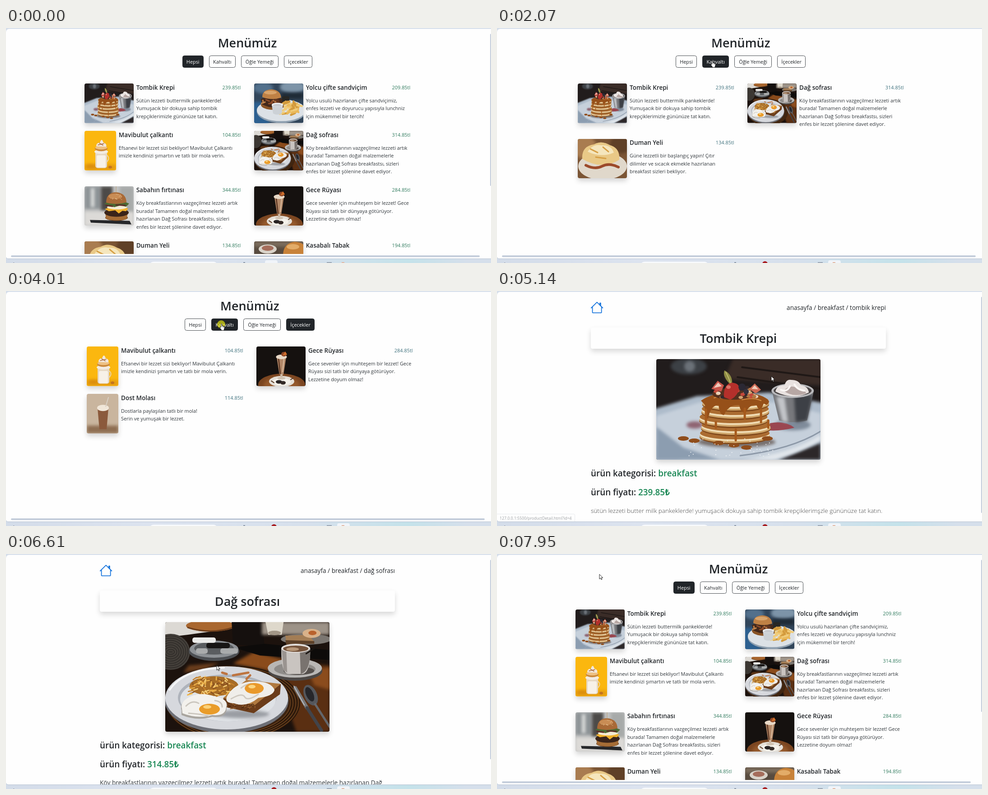
An HTML page that plays this animation: 1075x521 px, repeating every 8 s.

```html
<!DOCTYPE html>
<html lang="tr">
<head>
<meta charset="utf-8">
<title>Menümüz</title>
<style>
html, body { margin: 0; width: 100%; height: 100%; overflow: hidden; background: #d5deea; }
#stage { position: relative; width: 1075px; height: 521px; overflow: hidden; color: #212529;
  background: #d5deea; font-family: "Open Sans", "Noto Sans", sans-serif; }
#stage div, #stage svg, .t { position: absolute; }
#bar { left: 0; top: 511px; width: 1075px; height: 10px; overflow: hidden; font-size: 8px;
  background: linear-gradient(90deg, #d3dce9, #dce3ef 30%, #d6e0ec 62%, #c4e2ea 83%, #d5dfeb 95%); }
#bar span { position: absolute; top: 7px; line-height: 10px; color: #333; }
#page { left: 0; top: 2px; width: 1075px; height: 509px; overflow: hidden; background: #fefefe;
  border-radius: 7px 0 0 5px; box-shadow: 0 1px 1px #b9c4d2; }
#sheet { left: 0; top: -2px; width: 1075px; height: 600px; }
.t { line-height: 0; white-space: pre; }
.mid { transform: translateX(-50%); }
.end { transform: translateX(-100%); }
.bold { font-weight: 600; }
.light { font-weight: 300; color: #444; }
.copy { color: #30363b; }
.green { color: #198754; }
.price { color: #2f7a5d; }
.cool { color: #3d707c; }
.white { color: #fff; }
.pic { border-radius: 4px; overflow: hidden; box-shadow: 0 6px 12px #0000002b; }
.soft { filter: blur(3px); }
.btn { top: 60.5px; height: 27.5px; box-sizing: border-box; border: 1px solid #4b4f54; border-radius: 4.5px; }
.btn.on { background: #212529; border-color: #212529; }
.panel { left: 208px; top: 81px; width: 654px; height: 47px; border-radius: 4px; background: #fefefe;
  box-shadow: 0 6px 12px #00000026; }
.home { left: 207.4px; top: 22px; width: 29.2px; height: 29.2px; fill: none; stroke: #1976dd;
  stroke-linecap: round; stroke-linejoin: round; }
.thumb { background: #c5cedb; border-radius: 2px; }
#status { left: -1px; top: 492px; height: 18px; padding: 0 6px; border: 1px solid #dcdfe3;
  border-radius: 0 3px 0 0; background: #fff; color: #6b7075; font-size: 8.7px; line-height: 19px; white-space: pre; }
#click { width: 18px; height: 18px; margin: -9px; border-radius: 50%; background: #ffff0f99; }
#hand, #arrow { left: 0; top: 0; overflow: visible; width: 12px; height: 17px;
  fill: #fff; stroke: #111; stroke-width: .9; stroke-linejoin: round; }
</style>
</head>
<body>
<div id="stage">
  <div id="bar">
    <span style="left:-5px">05:15°C</span>
    <div style="left:318px;top:7px;width:151px;height:20px;border-radius:9px;background:#f7f9fc"></div>
    <div id="app" style="top:4px;width:28px;height:20px;border-radius:4px;background:#f0f4f9"></div>
    <div style="left:526px;top:8px;width:4px;height:4px;background:#8d99a8"></div>
    <div style="left:711px;top:8px;width:11px;height:4px;background:#9ba6b4"></div>
    <div style="left:744px;top:8px;width:6px;height:4px;background:#e3b9a4"></div>
    <div id="rec" style="left:588px;top:6px;width:12px;height:12px;border-radius:50%;background:#a81e22"></div>
    <span style="left:999px">20:20</span>
  </div>
  <div id="page">
    <div id="sheet"></div>
    <div id="vbar" class="thumb" style="left:1073px;width:3px"></div>
    <div id="hbar" class="thumb" style="left:11px;top:502px;height:3.5px"></div>
    <div id="status"></div>
  </div>
  <div id="click"></div>
  <svg id="hand"><path d="M3.2 8V1.3Q4.3-.4 5.4 1.3V5.2L9.6 6.2Q11 6.8 10.8 8.3L10 12.5 9 15.5H4.5L1 10.5Q-.2 8.9 1.2 8.1ZM7.2 6V8.5M9 6.4V8.6" transform="translate(-4.3)"/></svg>
  <svg id="arrow"><path d="M0 0V10.5L2.5 8.2 4.2 12 5.9 11.2 4.3 7.6H7.6Z"/></svg>
</div>
<script>
const LOOP = 8000;
const $ = id => document.getElementById(id);

// Drawing helpers
const oval = (x, y, rx, ry, fill, more = '') => `<ellipse cx="${x}" cy="${y}" rx="${rx}" ry="${ry}" fill="${fill}" ${more}/>`;
const box = (x, y, w, h, fill, more = '') => `<rect x="${x}" y="${y}" width="${w}" height="${h}" fill="${fill}" ${more}/>`;
const shape = (d, fill, more = '') => `<path d="${d}" fill="${fill}" ${more}/>`;
const line = (d, color, w) => `<path d="${d}" fill="none" stroke="${color}" stroke-width="${w}" stroke-linecap="round"/>`;
const soft = 'class="soft"';
const many = (n, f) => Array.from({ length: n }, (_, i) => f(i)).join('');
const rand = i => { const v = Math.sin(i * 127.1 + 3) * 43758.5; return v - Math.floor(v); };

// Scattered sticks, used for chips and grated cheese
const sticks = (n, x, y, w, h, len, width, colors) => many(n, i => {
  const a = rand(i) * 3.1, px = x + rand(i + 50) * w, py = y + rand(i + 99) * h;
  return line(`M${px.toFixed(1)} ${py.toFixed(1)}l${(Math.cos(a) * len).toFixed(1)} ${(Math.sin(a) * len * .6).toFixed(1)}`,
    colors[i % colors.length], width);
});
const chips = ['#e9b85a', '#d39a3c', '#f0cb78'];

// Each picture: width, height, drawing
const art = {
  krep: [364, 223,
    box(0, 0, 364, 223, '#211c1c') + oval(72, 16, 40, 18, '#3c4045', soft) + oval(74, 16, 12, 12, '#6b7178', soft) +
    shape('M170 0H364V58L150 44Z', '#3a2c27', soft) + line('M190 18L364 40M180 40L364 66', '#1f1816', 4) +
    shape('M-9 112L90 82 250 74 373 98V230H-9Z', '#aebccb', soft) +
    shape('M0 126L95 96H270L364 120V180L255 223H60L0 190Z', '#c6d0db', soft) +
    shape('M0 150L60 196 140 223H0Z', '#8c9db0', soft) + shape('M270 223L364 186V223Z', '#2c2729', soft) +
    shape('M190 223Q300 210 364 168V180Q320 206 262 223Z', '#e2e7ec', soft) + line('M186 214Q300 200 364 160', '#8d99a8', 3) +
    oval(302, 146, 40, 12, '#7f8b9a', soft) +
    shape('M252 142Q285 136 306 152Q275 160 248 158Z', '#9a4650') + oval(85, 146, 18, 8, '#8f6472', soft) +
    oval(178, 184, 86, 12, '#77706f', soft) +
    many(5, i => { const y = 173 - i * 18, x = 174 + Math.sin(i * 2.2) * 3;
      return oval(x, y, 78 - i, 16, '#81491b') + oval(x, y - 2, 78 - i, 15, '#cfa66b') +
        oval(x, y - 5, 77 - i, 14, '#f0dcb4') + oval(x, y - 9, 77 - i, 14, '#ab6c31'); }) +
    shape('M99 92Q130 72 175 76Q235 72 250 94Q246 106 238 98Q230 122 222 102Q205 100 198 120Q186 118 184 102Q160 100 150 124Q140 124 138 102Q120 102 115 132Q106 132 108 102Z', '#965019') +
    line('M110 112V146M196 110V132M176 156V180M232 112V140M248 136V152M132 140V152', '#a65a1c', 5) +
    line('M128 86Q150 78 168 84M190 90Q214 84 232 92', '#d08c46', 2) +
    oval(170, 77, 46, 13, '#54301f') +
    many(34, i => oval(126 + rand(i) * 96, 62 + rand(i + 30) * 24, 5, 3.5, ['#b07743', '#d3a271', '#33292c', '#c4473a', '#ead2bd'][i % 5])) +
    shape('M122 66L136 48 150 58 144 72Z', '#c8564b') + shape('M127 64L137 52 145 60Z', '#efc9bb') +
    shape('M206 66L218 54 232 68 220 76Z', '#cf6a55') + shape('M211 66L218 58 226 67Z', '#f0cdb9') +
    shape('M150 84Q148 60 164 52Q184 52 184 66Q178 84 164 90Z', '#b4302b') + oval(160, 62, 5, 4, '#dd7468') +
    oval(190, 62, 8, 8, '#2a2833') + oval(199, 72, 6, 6, '#34313d') +
    shape('M162 54Q146 38 151 25Q168 34 168 52Z', '#8d8b43') + line('M154 29Q160 40 164 52', '#c3bd72', 2) +
    shape('M256 70L272 136Q302 144 334 136L349 70Z', '#77787c') + shape('M266 84L279 138 292 140 284 84Z', '#c3c5c9', soft) +
    shape('M305 80L309 140 334 136 346 80Z', '#3d4046', soft) +
    oval(302, 70, 47, 16, '#b9b9bc') + oval(302, 70, 42, 12, '#4a4546') +
    shape('M264 72Q266 58 284 58Q288 44 298 46Q316 46 320 58Q336 60 338 74Q304 92 264 72Z', '#e9e2e0') +
    shape('M282 70Q298 54 314 66Q330 68 332 76Q302 86 282 70Z', '#b7a7a4') + line('M276 68Q290 74 296 60M306 56Q312 68 328 70', '#fbf7f5', 4) +
    [60, 84, 138, 172, 200, 246].map((x, i) => oval(x, 176 + (i % 5) * 5, 12, 5, '#8f4d1c')).join('') +
    many(40, i => oval(60 + rand(i) * 200, 176 + rand(i + 40) * 42, 1.1, .9, '#f3f5f7'))],
  sofra: [364, 243,
    box(0, 0, 364, 243, '#1c120d') + shape('M210 84L364 96V243H290L250 130Z', '#5a2f12', soft) +
    shape('M196 66L262 82 240 110 150 92Z', '#8a4b1b', soft) + shape('M316 108L364 100V150L330 140Z', '#8b4c1d', soft) +
    shape('M52 96L120 90 90 104 40 112Z', '#6a3d1c', soft) +
    shape('M0 0H150V14L50 28 0 34Z', '#dcd9d4') + oval(100, 8, 54, 13, '#a9672f') + line('M50 12Q100 28 150 12', '#6f3f1c', 3) +
    shape('M147 0H214L220 54 150 50Z', '#15100e') + box(214, 0, 150, 28, '#9d9388', soft) +
    shape('M222 0H262L258 28H228Z', '#ded8cb') + oval(242, 24, 14, 5, '#a29686') + oval(312, 38, 56, 12, '#7b7671') +
    shape('M266 30L318 28 330 44 268 46Z', '#a37d55') + shape('M266 40L330 42 330 48 268 50Z', '#5d4129') +
    oval(324, 25, 20, 10, '#d9b28a') + oval(326, 24, 9, 5, '#b9622d') +
    shape('M150 56L220 48 364 62V84L210 74Z', '#0d0b0a') + oval(12, 66, 43, 40, '#36322e') +
    many(8, i => oval(12, 66, 41 - i * 5, 38 - i * 5, 'none', 'stroke="#57514a" stroke-width="1"')) +
    oval(108, 65, 56, 21, '#4d5054') + oval(108, 60, 54, 19, '#8d9195') + oval(108, 58, 44, 14, '#5a5d60') +
    many(9, i => box(60 + (i * 31) % 80, 34 + (i % 3) * 12, 26, 12, ['#ebebe9', '#171514', '#a9abac'][i % 3], 'rx="5"')) +
    oval(150, 178, 149, 82, '#3b2210') + many(8, i => oval(150, 179, 148 - i * 3, 81 - i * 2, 'none', `stroke="${i % 2 ? '#75481f' : '#211207'}" stroke-width="1.2"`)) +
    oval(136, 174, 137, 72, '#6d6f76') + oval(136, 168, 136, 70, '#d6d8dd') + oval(137, 168, 109, 52, '#aeb3bb') + oval(139, 171, 106, 49, '#dfe2e6') +
    line('M10 150Q40 104 130 101', '#f6f7f8', 4) + oval(170, 204, 60, 9, '#9a9da3', soft) +
    oval(288, 108, 60, 22, '#4c4846') + oval(287, 102, 60, 21, '#b9b7b5') + oval(287, 104, 46, 14, '#8f8c89') + oval(296, 108, 34, 9, '#55504d') +
    shape('M257 58Q256 112 272 115H304Q322 112 321 58Z', '#c9c4c0') + shape('M298 62L300 115Q322 110 321 58Z', '#79736f') + shape('M258 62L262 106 270 112 268 62Z', '#9a9490') +
    oval(289, 58, 32, 10, '#e2dedb') + oval(289, 59, 28, 7, '#75543c') + oval(282, 60, 14, 4, '#b8987a') + line('M312 70L340 52', '#17120f', 3) +
    oval(108, 142, 54, 22, '#a76c26') + sticks(90, 58, 120, 88, 42, 11, 2.6, ['#eab04a', '#c47f29', '#8d5420', '#f4cd78']) +
    line('M126 112l10 3M150 118l34-6M180 126l8-8', '#bd7440', 5) +
    shape('M128 170L182 130 256 138 254 160 196 202 132 188Z', '#6b3c1a') + shape('M128 168L180 128 256 137 196 186Z', '#b0793f') +
    sticks(30, 134, 178, 70, 14, 6, 1.5, ['#9a6532', '#4d290f']) +
    shape('M136 166Q150 138 186 132Q232 128 242 150Q240 164 206 168Q180 190 152 180Q132 180 136 166Z', '#f0eeea') +
    line('M146 170Q170 156 176 166T206 160M168 146Q178 138 190 136', '#cfc9c0', 3) +
    oval(197, 147, 21, 12, '#e9992b') + oval(192, 143, 8, 4, '#fbd682') +
    shape('M36 196Q30 178 56 166Q80 154 110 166Q142 170 136 190Q136 214 104 210Q70 220 36 206Z', '#a9a59f') +
    shape('M37 192Q32 176 56 165Q80 154 110 165Q140 170 135 188Q134 209 104 206Q70 215 38 202Z', '#f3f1ed') +
    line('M46 186Q60 172 74 180M110 174Q126 176 126 188M52 202Q80 204 96 208', '#cbc6be', 3) +
    oval(98, 193, 23, 12, '#e99c2a') + oval(93, 188, 9, 4, '#fbd27a') +
    line('M288 146L314 190', '#77787b', 8) + line('M285 142L308 184', '#b9babd', 2) + line('M314 190L346 240', '#42444a', 7) +
    oval(322, 162, 14, 24, '#55575c', 'transform="rotate(-24 322 162)"') + oval(320, 160, 8, 17, '#26262a', 'transform="rotate(-24 320 160)"') +
    line('M332 182L364 232', '#63666b', 5)],
  cifte: [109, 87,
    box(0, 0, 109, 87, '#31455a') + oval(85, 8, 28, 14, '#7d94a8', soft) + oval(20, 10, 22, 12, '#52708c', soft) + box(60, 20, 49, 14, '#1f2b36', soft) +
    oval(8, 70, 30, 30, '#2d6090', soft) + oval(60, 62, 54, 25, '#8fa0b0') + oval(60, 59, 54, 24, '#dce1e6') +
    oval(42, 47, 27, 11, '#8a5426') + shape('M15 34Q40 26 70 36L66 50Q40 58 18 46Z', '#44291b') + sticks(14, 18, 33, 40, 12, 9, 3, ['#8f4d2a', '#62351f', '#c0824a']) +
    shape('M18 30Q18 14 38 13Q58 14 60 31Q40 38 18 30Z', '#bf8145') + oval(36, 20, 14, 4, '#d8a46b') +
    box(62, 28, 16, 14, '#272725', 'rx="3"') + sticks(36, 66, 38, 34, 28, 11, 4.5, chips) +
    shape('M39 47L42 66Q51 71 61 66L64 47Z', '#ccd1d6') + oval(51.5, 47, 12.5, 4.5, '#f0f1f2') + oval(51.5, 48, 10, 3, '#c8cbd0')],
  shake: [70, 87,
    box(0, 0, 70, 87, '#fbb70f') + box(0, 74, 70, 13, '#e59c10', soft) + oval(15, 78, 12, 4, '#d98a0c', soft) +
    box(24, 44, 26, 38, '#e6d8c4', 'rx="5"') + box(27, 54, 20, 27, '#f7f1e8', 'rx="3"') + line('M50 54q7 6 0 14', '#e8d3ae', 2) +
    oval(37, 46, 15, 5, '#f3ece2') + oval(37, 39, 14, 6, '#cc8a3e') + oval(37, 37, 13, 4, '#eec183') +
    shape('M26 34Q26 26 34 26Q38 14 42 26Q50 28 48 35Z', '#f2e7dc') + line('M30 31l13-3M33 27l8 5', '#a9693a', 1.5) + oval(57, 80, 4, 3, '#c27420')],
  sabah: [109, 87,
    box(0, 0, 109, 87, '#c2c3c3') + box(0, 0, 36, 50, '#8d9396', soft) + box(14, 4, 8, 42, '#d9dbda', soft) + box(36, 0, 26, 54, '#4c4a48', soft) +
    box(78, 0, 31, 60, '#a7aaa9', soft) + box(0, 56, 109, 31, '#dcdad7', soft) + shape('M12 74L100 76 104 84 14 80Z', '#26272a') +
    oval(71, 69, 25, 7, '#7a4c27') + shape('M46 60H96L93 72Q70 78 48 71Z', '#a66d36') + oval(71, 58, 27, 9, '#3a241a') +
    shape('M45 50Q70 40 97 49L92 55 84 54 76 60 68 53 54 55Z', '#f1b12c') + oval(72, 46, 22, 5, '#f4ead3') +
    shape('M43 38Q70 26 99 38L92 45 80 42 66 46 52 41Z', '#4c6a32') + line('M48 42l14 2M70 41l20 1', '#5c2d27', 3) +
    shape('M48 36Q48 14 70 13Q92 15 93 35Q70 42 48 36Z', '#a96a37') + oval(68, 22, 15, 6, '#c98c54') +
    many(14, i => oval(57 + rand(i) * 27, 17 + rand(i + 9) * 12, .8, .6, '#f0d9ae')) + line('M70 14V0', '#b69b72', 1)],
  gece: [109, 87,
    box(0, 0, 109, 87, '#15110f') + oval(56, 84, 52, 24, '#7b4621') + oval(56, 84, 40, 17, '#94592c', soft) +
    oval(56, 77, 28, 12, '#e4dfd7') + oval(56, 78, 20, 8, '#f4f1ea') + shape('M45 24H66L60 62H51Z', '#b28868') +
    line('M49 26L53 60', '#5a3522', 2.5) + line('M61 27L58 56', '#dbbda0', 2) + box(53, 61, 5, 8, '#cbb8a4') + oval(55.5, 70, 9, 3, '#cfc2b2') +
    oval(55.5, 23, 12, 5, '#e8d9c7') + oval(61, 17, 6, 5, '#8d4525') + shape('M58 20L64 11 68 18Z', '#d06f2a') +
    oval(50, 78, 7, 4, '#272323') + oval(59, 80, 6, 4, '#342b27') + line('M33 76l6 4M76 73l5-3', '#5c3d28', 2)],
  duman: [109, 87,
    box(0, 0, 109, 87, '#7b5535') + oval(95, 12, 24, 20, '#5f4027', soft) + oval(15, 18, 26, 26, '#a97c50', soft) + oval(55, 60, 54, 30, '#e0d8cb') +
    shape('M10 44Q8 16 36 12Q52 2 72 14Q94 20 92 46Q54 70 10 44Z', '#e9c987') + shape('M22 28Q34 10 52 14Q74 12 80 30Q52 42 22 28Z', '#f5e6bd') +
    line('M28 22l16 8M56 18l12 10M40 40l22 3', '#d69f45', 3) + line('M18 58q20 10 36 2t36 2', '#9c4a2b', 6)],
  kasaba: [109, 87,
    box(0, 0, 109, 87, '#584b3f') + box(0, 0, 109, 12, '#7b6c5c', soft) + box(0, 64, 60, 23, '#3a302a', soft) +
    oval(30, 17, 20, 10, '#d9d3c9') + oval(30, 15, 13, 6, '#a56d5b') + shape('M8 64Q30 38 109 44V78Q60 92 16 78Z', '#9a683b') + line('M10 68Q30 84 108 76', '#5c371d', 3) +
    oval(88, 52, 22, 10, '#b67a3d') + box(66, 36, 43, 13, '#5a3522', 'rx="5"') + line('M66 37q10 6 20 1t22 2', '#6f8b3a', 4) + line('M68 43h40', '#e1a83b', 3) +
    shape('M64 34Q63 4 90 1Q109 2 112 12V36Q86 42 64 34Z', '#c88239') + oval(86, 12, 14, 6, '#e3ac68') +
    sticks(42, 20, 34, 38, 32, 16, 4.5, ['#f0ca55', '#dcab38', '#f6dc83'])],
  bozkir: [109, 87,
    box(0, 0, 109, 87, '#2a221d') + many(5, i => oval(10 + i * 24, 9, 9, 7, i % 2 ? '#8c7358' : '#5a4635', soft)) + box(0, 68, 109, 19, '#8a6d50') +
    oval(55, 58, 56, 27, '#aca69c') + oval(55, 55, 56, 26, '#eeebe5') + oval(56, 58, 40, 17, '#d8c4ae') +
    many(5, i => line(`M${42 + i * 5} ${28 + i * 3}Q${66 + i * 3} ${26 + i * 3} ${86 + i * 3} ${46 + i * 2}`, i % 2 ? '#86994a' : '#5f7c35', 4)) +
    oval(27, 45, 14, 10, '#dd8a2e') + oval(24, 52, 10, 7, '#e9b14f') + oval(38, 40, 8, 6, '#c55c28') + oval(60, 71, 32, 7, '#5c2c17') +
    shape('M38 56Q40 44 60 44Q84 44 84 56L82 70Q60 78 40 69Z', '#5b301c') + oval(61, 54, 22, 9, '#8f5330') + line('M48 52l18 6M58 48l16 7', '#3a1d12', 2.5)],
  dost: [70, 87,
    box(0, 0, 70, 87, '#c9b59e') + box(0, 70, 70, 17, '#8e6e52', soft) + shape('M24 32H48L44 78H28Z', '#8b5a3c') + oval(36, 31, 13, 7, '#f0e6d8') + line('M42 28L48 8', '#d9d0c4', 2)]
};

// kind, picture, title, price, description
const dishes = [
  [1, 'krep', 'Tombik Krepi', '239.85', 'Sütün lezzeti buttermilk pankeklerde!|Yumuşacık bir dokuya sahip tombik|krepçiklerimizle gününüze tat katın.'],
  [2, 'cifte', 'Yolcu çifte sandviçim', '209.85', 'Yolcu usulü hazırlanan çifte sandviçimiz,|enfes lezzeti ve doyurucu yapısıyla lunchniz|için mükemmel bir tercih!'],
  [3, 'shake', 'Mavibulut çalkantı', '104.85', 'Efsanevi bir lezzet sizi bekliyor! Mavibulut Çalkantı|imizle kendinizi şımartın ve tatlı bir mola verin.'],
  [1, 'sofra', 'Dağ sofrası', '314.85', 'Köy breakfastlarının vazgeçilmez lezzeti artık|burada! Tamamen doğal malzemelerle|hazırlanan Dağ Sofrası breakfastsı, sizleri|enfes bir lezzet şölenine davet ediyor.'],
  [2, 'sabah', 'Sabahın fırtınası', '344.85', 'Köy breakfastlarının vazgeçilmez lezzeti artık|burada! Tamamen doğal malzemelerle|hazırlanan Dağ Sofrası breakfastsı, sizleri|enfes bir lezzet şölenine davet ediyor.'],
  [3, 'gece', 'Gece Rüyası', '284.85', 'Gece sevenler için muhteşem bir lezzet! Gece|Rüyası sizi tatlı bir dünyaya götürüyor.|Lezzetine doyum olmaz!'],
  [1, 'duman', 'Duman Yeli', '134.85', 'Güne lezzetli bir başlangıç yapın! Çıtır|dilimler ve sıcacık ekmekle hazırlanan|breakfast sizleri bekliyor.'],
  [2, 'kasaba', 'Kasabalı Tabak', '194.85', 'Kasaba mutfağının yöresel lezzetleriyle|hazırlanan bu lunch, tadına doyum olmayan|bir deneyim sunuyor. Üstelik uygun fiyatıyla|da tercih sebebi!'],
  [3, 'dost', 'Dost Molası', '114.85', 'Dostlarla paylaşılan tatlı bir mola!|Serin ve yumuşak bir lezzet.'],
  [2, 'bozkir', 'Bozkır Lokması', '344.85', 'Bozkır etinin eşsiz lezzeti, özel baharatlar ve|soslarla birleşiyor. Bozkır Lokması, akşam|yemeğiniz için mükemmel bir seçim!']
];
const buttons = [['Hepsi', 390.5, 47.5], ['Kahvaltı', 449.5, 59.5], ['Öğle Yemeği', 520.5, 83.5], ['İçecekler', 615.5, 63.5]];

// Text placed by its baseline
const text = (x, base, size, str, cls = '') =>
  `<span class="t ${cls}" style="left:${x}px;top:${base - .388 * size}px;font-size:${size}px">${str}</span>`;
const picture = (name, x, y, w, h) => {
  const [vw, vh, body] = art[name];
  return `<svg class="pic" viewBox="0 0 ${vw} ${vh}" preserveAspectRatio="none" style="left:${x}px;top:${y}px;width:${w}px;height:${h}px">${body}</svg>`;
};

function card([, pic, title, price, copy], x, y, tone) {
  const w = art[pic][0] === 70 ? 70 : 109, tx = x + w + 6;
  return picture(pic, x, y, w, 87.5) + text(tx, y + 14, 13.5, title, 'bold') +
    text(x + 346.5, y + 13.2, 10.9, price + 'tl', 'end ' + tone) +
    copy.split('|').map((s, i) => text(tx, y + 42 + i * 17.5, 10.9, s, 'copy')).join('');
}

function menu(kind, hover) {
  const dx = kind ? 5.3 : 0;
  let html = text(535 + dx, 43, 27, 'Menümüz', 'mid bold');
  buttons.forEach(([name, x, w], i) => {
    const on = i === kind || i === hover;
    html += `<div class="btn ${on ? 'on' : ''}" style="left:${x + dx}px;width:${w}px"></div>` +
      text(x + dx + w / 2, 79.3, 10.9, name, 'mid ' + (on ? 'white' : ''));
  });
  const list = dishes.filter(d => !kind || d[0] === kind);
  for (let i = 0, y = 123; i < list.length; i += 2) {
    const row = list.slice(i, i + 2);
    row.forEach((d, j) => html += card(d, 173.7 + dx + j * 376, y, kind ? 'cool' : 'price'));
    y += row.some(d => d[4].split('|').length > 3) ? 122.5 : 105;
  }
  return html + '<div style="left:0;top:500.5px;width:1075px;height:100px;background:#fefefe"></div>';
}

const house = `<svg class="home" viewBox="0 0 16 16"><path d="M1 8.5L8 1.6 15 8.5M2.5 7.5V13.5Q2.5 14.5 3.5 14.5H12.5Q13.5 14.5 13.5 13.5V7.5"/>
  <path d="M11.5 2.5H12.5V6L11.5 5Z" fill="#1976dd"/></svg>`;

function detail(pic, crumb, title, price, height, copy, cls) {
  const y = 151 + height;
  return house + text(862, 42, 13.6, 'anasayfa / breakfast / ' + crumb, 'end') +
    '<div class="panel"></div>' + text(535, 115.5, 27, title, 'mid bold') +
    picture(pic, 352.7, 151, 364.3, height) +
    text(208, y + 37.5, 18.9, 'ürün kategorisi: <span class="green">breakfast</span>', 'bold') +
    text(208, y + 79.5, 18.9, `ürün fiyatı: <span class="green">${price}₺</span>`, 'bold') +
    copy.map((s, i) => text(208, y + 118 + i * 21.9, 13.6, s, cls)).join('');
}

const views = {
  first: () => detail('krep', 'tombik krepi', 'Tombik Krepi', '239.85', 223,
    ['sütün lezzeti butter milk pankeklerde! yumuşacık dokuya sahip tombik krepçiklerimşzle gününüze tat katın.'], 'light'),
  dish: () => detail('sofra', 'dağ sofrası', 'Dağ sofrası', '314.85', 243,
    ['Köy breakfastlarının vazgeçilmez lezzeti artık burada! Tamamen doğal malzemelerle hazırlanan Dağ',
     'Sofrası breakfastsı, sizleri enfes bir lezzet şölenine davet ediyor.'], 'copy'),
  blank: () => ''
};

// Timeline, in ms
const scenes = [[0, 0], [1750, 1], [2600, 2], [3060, 3], [4080, 1], [4880, 'first'], [5470, 'dish'], [7700, 'blank'], [7950, 0]];
const hovers = [[1480, 2400, 1], [2460, 2740, 2], [2790, 3400, 3], [3660, 4200, 1]];
const hands = [[1380, 2380], [2460, 2740], [2790, 3400], [3440, 3600], [3660, 4200], [4500, 4880], [7010, 7700]];
const clicks = [[1680, 1800], [2540, 2640], [2900, 3090], [4010, 4120], [4780, 4880], [7180, 7320]];
const path = [[120, 601, 512], [860, 735, 122], [930, 735, 120], [1380, 466, 62], [1480, 466, 62], [1640, 478, 72],
  [2330, 478, 72], [2500, 567, 75], [2640, 567, 75], [2860, 646, 73], [3190, 646, 73], [3800, 478, 72], [4120, 478, 72],
  [4640, 608, 189], [5470, 608, 189], [5950, 470, 256], [6280, 470, 256], [6560, 467, 247], [6680, 467, 247],
  [7030, 222, 37], [7400, 222, 37], [7880, 227, 45]];
const scrolls = [[5750, 0], [5960, 39.5], [6280, 39.5], [6460, 0]];

const during = (spans, t) => spans.find(([a, b]) => t >= a && t < b);
function follow(track, t) {
  const i = track.findIndex(p => p[0] > t);
  if (i < 1) return (i ? track[track.length - 1] : track[0]).slice(1);
  const a = track[i - 1], b = track[i], u = (t - a[0]) / (b[0] - a[0]), e = u * u * (3 - 2 * u);
  return a.slice(1).map((v, k) => v + (b[k + 1] - v) * e);
}
const show = (id, on) => $(id).style.visibility = on ? 'visible' : 'hidden';

let drawn;
function draw(now) {
  const t = now % LOOP;
  const scene = scenes.filter(s => s[0] <= t).pop()[1];
  const isMenu = typeof scene === 'number';
  const hover = isMenu ? (during(hovers, t) || [])[2] : undefined;
  const key = scene + ':' + hover;
  if (key !== drawn) {
    $('sheet').innerHTML = isMenu ? menu(scene, hover) : views[scene]();
    drawn = key;
  }

  const [scroll] = scene === 'dish' ? follow(scrolls, t) : [0];
  $('sheet').style.transform = `translateY(${-scroll}px)`;
  const length = { 0: 337, first: 479, dish: 442 }[scene];
  show('vbar', length);
  $('vbar').style.top = 11 + scroll * .86 + 'px';
  $('vbar').style.height = (length || 0) + 'px';
  show('hbar', isMenu);
  $('hbar').style.width = (scene ? 1050 : 1039) + 'px';

  const onDish = t >= 4500 && t < 5270, onHome = t >= 7090 && t < 7700;
  show('status', onDish || onHome);
  $('status').textContent = '127.0.0.1:5500/' + (onHome ? 'index.html' : 'productDetail.html?id=4');
  $('status').style.opacity = onDish && t > 5080 ? Math.max(0, 1 - (t - 5080) / 190) : 1;

  const [x, y] = follow(path, t);
  const hand = during(hands, t);
  show('hand', t >= 120 && hand);
  show('arrow', t >= 120 && !hand);
  show('click', during(clicks, t));
  $('hand').style.transform = $('arrow').style.transform = `translate(${x}px,${y}px)`;
  $('click').style.left = x - 1 + 'px';
  $('click').style.top = y + 2 + 'px';
  show('rec', t >= 490);
  $('app').style.left = (t < 1700 ? 574 : 734) + 'px';
  requestAnimationFrame(() => draw(performance.now()));
}
draw(performance.now());
</script>
</body>
</html>
```
